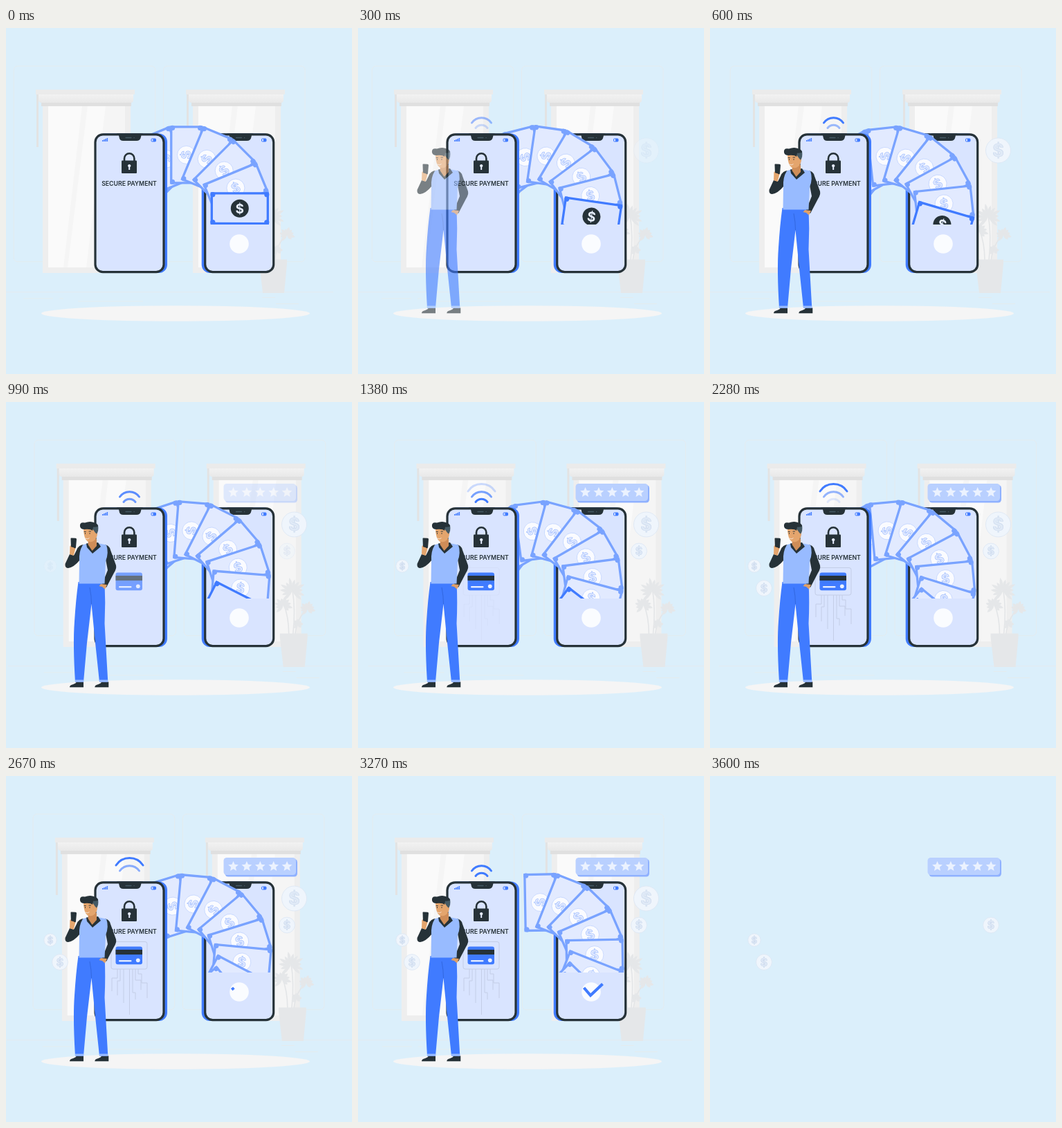
An HTML page that plays this animation: 500 px wide and 500 px high, repeating every 3.63 s.

```html
<!DOCTYPE html>
<html lang="en">
<head>
<meta charset="utf-8">
<title>Secure payment</title>
<style>
  html, body { margin: 0; width: 100%; height: 100%; overflow: hidden; background: #dbeffb; }
  svg { display: block; width: 100vw; height: 100vh; }
  text { font-family: Inter, "Open Sans", sans-serif; text-anchor: middle; }
</style>
</head>
<body>
<svg viewBox="0 0 500 500">
  <defs>
    <clipPath id="slot"><path d="M0 0H500V284H0z"/></clipPath>
    <linearGradient id="blind" x2="0" y2="1">
      <stop stop-color="#f2f2f2"/><stop offset="1" stop-color="#e8e8e8"/>
    </linearGradient>
    <g id="window">
      <path fill="#eeeeee" d="M80 112H207V354H80z"/>
      <path fill="#f5f5f5" d="M88 112H199V346H88z"/>
      <path fill="#fafafa" d="M88 112H137L110 346H88zM145 112H171L143 346H116z"/>
      <path fill="#e3e3e3" d="M71 96h3v76h-3z"/>
      <path fill="#e0e0e0" d="M78 104H208V113H78z"/>
      <path fill="url(#blind)" d="M74 96H211V104Q211 108 207 108H79Q74 108 74 104z"/>
      <path fill="#ebebeb" d="M70 89H213V96H70z"/>
    </g>
    <g id="phone">
      <rect x="131" y="152.500" width="102" height="201.500" rx="12" fill="#407bff"/>
      <rect x="129" y="153.900" width="99" height="198.800" rx="11" fill="#d9e4ff" stroke="#263238" stroke-width="3.2"/>
    </g>
    <g id="status">
      <path fill="#263238" d="M160 152.500H198Q195.500 154 195 157.500Q194 163 188.500 163H169.500Q164 163 163.500 157.500Q163 154 160 152.500z"/>
      <path stroke="#455a64" stroke-width="1.300" stroke-linecap="round" d="M173 158.500h8M185 158.500h.2"/>
      <rect x="210" y="160" width="6.500" height="4" rx="1" fill="none" stroke="#407bff"/>
      <path fill="#407bff" d="M212.500 160h4v4h-4z"/>
    </g>
  </defs>

  <g id="scene">
    <g id="room">
      <g fill="none" stroke="#e6ebee" stroke-width=".9">
        <rect x="38.200" y="55" width="204.500" height="282.800" rx="5.700"/>
        <rect x="254.500" y="55" width="204.500" height="282.800" rx="5.700"/>
        <path d="M0 381.700H500M417 398.500h33M397 389.500h19M52 391h43M104 391h6M131 395h94"/>
      </g>
      <use href="#window"/>
      <use href="#window" x="217"/>
      <g id="plant" fill="#e5e7e9">
        <path fill="none" stroke="#e3e5e7" stroke-width="1.600" d="M411 270Q416 300 412 336M398 291Q406 310 406 336M433 298Q418 312 415 336"/>
        <path d="M393 334.500H433V340L429 383H398L393 340z"/>
      </g>
    </g>
    <ellipse cx="245" cy="412.500" rx="194" ry="11.300" fill="#f5f5f5"/>

    <use href="#phone" transform="matrix(-1 0 0 1 515.700 0)"/>
    <use href="#status" x="159.500"/>
    <circle cx="337" cy="312" r="13.800" fill="#fafcff"/>
    <path id="tick" d="M326.500 306L336 317L353.500 300.500" fill="none" stroke="#407bff" stroke-width="4.200" pathLength="1"/>
    <g clip-path="url(#slot)"><g id="bills"></g></g>

    <use href="#phone"/>
    <use href="#status"/>
    <path fill="#407bff" d="M139 162h1.500v2h-1.500zM141.200 161h1.500v3h-1.500zM143.400 160h1.500v4h-1.500zM145.600 159h1.500v5h-1.500z"/>
    <path fill="none" stroke="#263238" stroke-width="2.600" d="M171 193V188.500a7.200 7.200 0 0 1 14.400 0V193"/>
    <rect x="167" y="191.500" width="22" height="18.500" rx="1" fill="#263238"/>
    <path fill="#e6edff" d="M178.200 197a2.100 2.100 0 0 1 1 4v4h-2v-4a2.100 2.100 0 0 1 1-4z"/>
    <text x="178" y="227.600" font-size="8.750" font-weight="600" fill="#263238">SECURE PAYMENT</text>

    <g id="circuit" fill="none" stroke="#c3cde6" stroke-width="1">
      <rect x="152" y="239.500" width="52" height="39.500" rx="3"/>
      <path d="M178.500 279V345M170 279V328M161 279V292H153V311M165 279V296H161V317M187 279V295H195V309M191 279V286H196V299H204V321M183 279V313H187V323"/>
    </g>
    <g id="card">
      <rect x="158.500" y="246.500" width="38.500" height="25.700" rx="3" fill="#407bff"/>
      <path fill="#263238" d="M158.500 251H197V258H158.500z"/>
      <path stroke="#fff" stroke-width="2" stroke-linecap="round" d="M164 267.300h16.500"/>
      <circle cx="190.800" cy="266.300" r="2.900" fill="#ebf1ff"/>
    </g>
    <g id="wifi" fill="none" stroke="#407bff" stroke-width="3" stroke-linecap="round">
      <path d="M159 129A23.500 23.500 0 0 1 198 129"/>
      <path d="M164.500 137A17 17 0 0 1 192.500 137"/>
      <path d="M170 144.500A10.500 10.500 0 0 1 187 144.500"/>
    </g>

    <g id="person">
      <path id="shoe" fill="#263238" d="M92 412.300Q92 409 97 408Q101 406.500 102 404.500H112V412.300z"/>
      <use href="#shoe" x="36.300"/>
      <path fill="#407bff" d="M104.500 260H142.500Q144 290 142.500 320L147.300 404.500H135L129 348L123.500 292L117 348L112 404.500H100Q96.500 350 99 317Q101 285 104.500 260z"/>
      <path fill="#98bbff" d="M99.800 401.500H112.200V404.500H100zM134.700 401.500H147.200V404.500H135z"/>
      <path fill="none" stroke="#2f62d6" stroke-width=".8" d="M123.500 292Q123.500 280 121 268"/>
      <path fill="#263238" d="M113 206Q105 206 102 214L94 230L99 222L92 220L85.500 234Q85 240 90 240Q98 239 107 228zM141 206Q149 206 151 214L159 236Q160 241 156 247L145 268L139 263L147 243L143 222z"/>
      <path fill="#e0a068" d="M146 264L137 263L134.500 266L139 267L143 270.500z"/>
      <path fill="#98bbff" d="M111 206.500L118 204H132L145 206.500Q149 218 144 230L142.500 262.500H105.500L106 230Q105 216 111 206.500z"/>
      <path fill="#263238" d="M116 204.500L133 203L137 209L131 214L125 219L117 210z"/>
      <path fill="#cf8d58" d="M119 198H131V208L124.500 215L118.500 206z"/>
      <path fill="#e4a56d" d="M112 184Q113 181 122 181L132 183Q133 194 129.500 198Q125 204 118 201.500Q112.500 198 112 184z"/>
      <path fill="#455a64" d="M124 182L133 178Q134.500 187 130.500 191L127 186z"/>
      <path fill="#263238" d="M107 180Q106 173 114 174.500Q122 171.500 128 174.500Q133.500 176 133 180L126 181L125 186Q122 183 113 184Q108 184 107 180z"/>
      <circle cx="128.500" cy="191.500" r="2.300" fill="#e4a56d"/>
      <path fill="none" stroke="#263238" stroke-width=".9" stroke-linecap="round" d="M114.500 189.500v1M121 189.500v1M113.200 187.500h2M120 187h2.500"/>
      <path fill="none" stroke="#f6e6da" stroke-width=".9" d="M115 197Q118 199 120.500 196.500"/>
      <path fill="#e4a56d" d="M92.500 208L97 206L101 209L99 217L97.500 222L92 220z"/>
      <path fill="#263238" d="M93.500 197.500Q93.300 196.500 94.500 196.500L100.500 196.800Q102 197 102 198.500L101 210Q100.800 211.500 99.500 211.300L95 210.500Q94 210 93.900 208.500z"/>
      <path stroke="#e4a56d" stroke-width="1.600" stroke-linecap="round" d="M93.500 210l4 1M94 213l4 1"/>
    </g>
    <g id="bigCoin"></g>
  </g>

  <g id="rating">
    <rect x="316.500" y="120" width="104.500" height="25.500" rx="4.500" fill="#8fb1ff"/>
    <rect x="314.500" y="118" width="104.500" height="25" rx="4.500" fill="#b9d0ff"/>
  </g>
  <g id="coinA"></g>
  <g id="coinB"></g>
  <g id="coinC"></g>
</svg>
<script>
const LOOP = 3630, CUT = 3600;
const $ = id => document.getElementById(id);
const add = (id, markup) => $(id).insertAdjacentHTML('beforeend', markup);
const clamp = v => Math.max(0, Math.min(1, v));

const dollar = (x, y, size, style) =>
  `<text x="${x}" y="${y + size * .36}" font-size="${size}" font-weight="700" ${style}>$</text>`;

function coin(id, x, y, r) {
  add(id, `<circle cx="${x}" cy="${y}" r="${r}" fill="#eff5fc" stroke="#d9e4f3" stroke-width=".7"/>` +
    dollar(x, y, r * 1.4, 'fill="#e0eaf7" stroke="#cbd9ed" stroke-width=".7"'));
}

// Bills lie on an arc around the origin, long side pointing outwards.
function bill(angle, lead) {
  const ink = lead ? '#407bff' : '#79a3ff';
  const corners = [[-39, -20], [39, -20], [-39, 20], [39, 20]]
    .map(([x, y]) => `<circle cx="${x}" cy="${y}" r="3.600" fill="${ink}"/>`).join('');
  const mark = lead ? 'fill="#e6eeff"' : 'fill="#e3ebff" stroke="#a3bfff" stroke-width=".7"';
  return `<g transform="rotate(${angle}) translate(77.300)">
    <rect x="-40.500" y="-21.800" width="81" height="43.600" fill="${lead ? '#d9e4ff' : '#e2eaff'}" stroke="${ink}" stroke-width="3.300"/>
    ${corners}<circle r="13" fill="${lead ? '#263238' : '#fafbff'}" stroke="${lead ? 'none' : '#bdd1ff'}" stroke-width=".7"/>
    ${dollar(0, 0, 19, mark)}</g>`;
}

// A fan of pointed leaflets around one stem tip.
function frond(x, y, r, count) {
  for (let i = 0; i < count; i++) {
    const a = -225 + 270 * i / (count - 1), len = r * (.88 + .12 * Math.cos(i * 2.4));
    add('plant', `<path transform="translate(${x} ${y}) rotate(${a})" d="M0 0Q${len * .6} -5 ${len} 0Q${len * .6} 4 0 0"/>`);
  }
}

frond(411, 273, 20, 12);
frond(398, 294, 14, 10);
frond(433, 299, 12, 10);
frond(419, 321, 8, 7);
for (let i = 8; i >= 0; i--) add('bills', bill(-22.5 * i, i === 0));
for (let i = 0; i < 5; i++) {
  const points = Array.from({ length: 10 }, (_, k) => {
    const r = k % 2 ? 3.5 : 7.8, a = (k / 5 - .5) * Math.PI;
    return `${328.500 + 19.4 * i + r * Math.cos(a)},${130.700 + r * Math.sin(a)}`;
  });
  add('rating', `<polygon points="${points.join(' ')}" fill="#ebf2ff"/>`);
}
coin('bigCoin', 416.5, 177, 18);
coin('coinA', 64, 237, 9.2);
coin('coinB', 78, 269, 11.4);
coin('coinC', 406, 215.5, 11.4);

// Start and end of each fade-in, in ms.
const fades = {
  person: [30, 480], bigCoin: [100, 550], card: [700, 1150], rating: [800, 1250],
  coinC: [750, 1200], coinA: [850, 1300], circuit: [1260, 1800], coinB: [1400, 1850]
};
// [time, opacity] pairs for the outer, middle and inner signal arcs.
const pulses = [
  [[1200, 0], [1890, 1], [2670, 1], [3100, 0]],
  [[0, 0], [600, 1], [1380, .7], [1890, .5], [2670, .6], [3270, 1]],
  [[0, 0], [600, .5], [1380, 1], [1890, .28], [2670, 0], [3270, 1]]
];

function sample(keys, t) {
  const next = keys.findIndex(k => k[0] > t);
  if (next < 0) return keys[keys.length - 1][1];
  if (next === 0) return keys[0][1];
  const [a, b] = [keys[next - 1], keys[next]];
  return a[1] + (b[1] - a[1]) * (t - a[0]) / (b[0] - a[0]);
}

function draw(now) {
  const t = now % LOOP, u = t / CUT;
  $('scene').style.display = t < CUT ? '' : 'none';
  $('room').setAttribute('transform', `translate(${27 - .03 * Math.abs(t - 1800)} 0)`);
  // The arc's centre drifts right and sags slightly while the bills turn.
  const cx = 260.5 + 4.5 * u, cy = 260.7 - 2 * u + 3.7 * Math.sin(Math.PI * u);
  $('bills').setAttribute('transform', `translate(${cx} ${cy}) rotate(${98 * u})`);
  for (const [id, [from, to]] of Object.entries(fades))
    $(id).setAttribute('opacity', clamp((t - from) / (to - from)));
  pulses.forEach((keys, i) => $('wifi').children[i].setAttribute('opacity', sample(keys, t)));
  const drawn = clamp((t - 2620) / 500);
  $('tick').setAttribute('stroke-dasharray', `${drawn} 2`);
  $('tick').setAttribute('opacity', drawn > 0 ? 1 : 0);
  requestAnimationFrame(() => draw(performance.now()));
}
draw(0);
</script>
</body>
</html>
```
